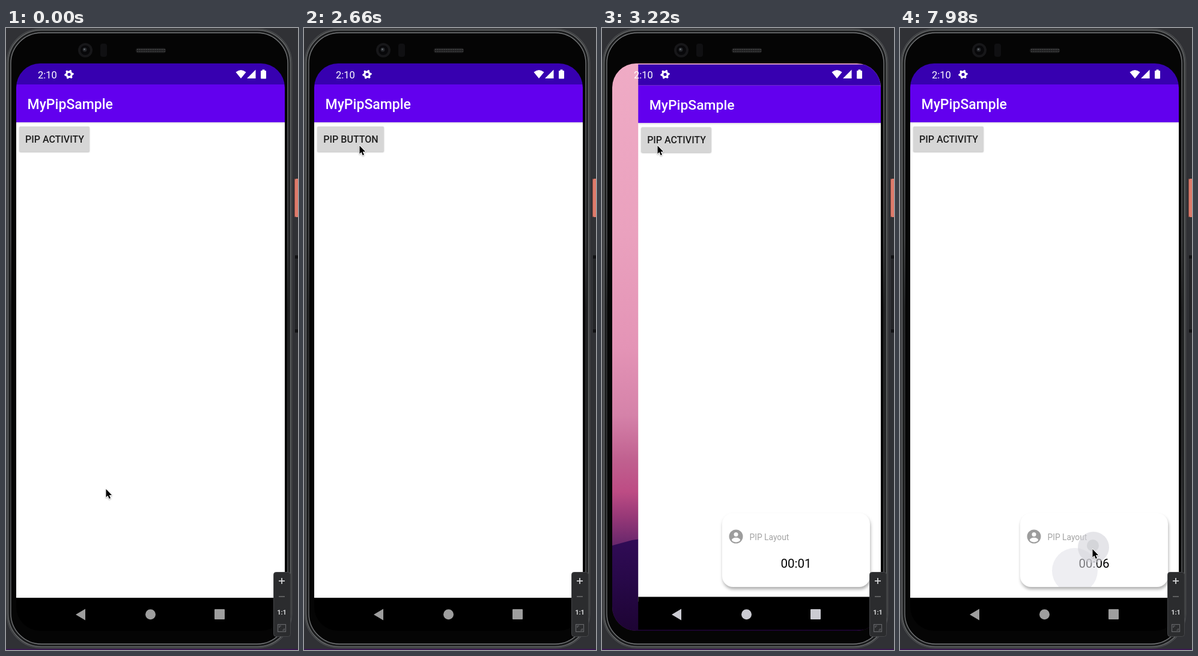
These frames come from a looping animation (486 by 1036 pixels, 8 s). An HTML page with a canvas:

```html
<!DOCTYPE html>
<html lang="en">
<head>
<meta charset="utf-8">
<title>Picture in picture</title>
<style>
html, body { margin: 0; width: 486px; height: 1036px; overflow: hidden; background: #2d2e32; }
canvas { display: block; }
</style>
</head>
<body>
<canvas id="stage" width="486" height="1036"></canvas>
<script>
const c = document.getElementById('stage').getContext('2d');
const LOOP = 8000, STEP = 70;
const SCREEN = { x: 17, y: 59, w: 447, h: 945 };
const PIP = { x: 200, y: 808, w: 246, h: 123 };

const clamp = v => Math.max(0, Math.min(1, v));
const mix = (a, b, k) => a + (b - a) * k;
const span = (t, start, end) => clamp((t - start) / (end - start));
const smooth = k => k * k * (3 - 2 * k);

// cubic-bezier(.4, 0, .2, 1)
function ease(x) {
  if (x <= 0 || x >= 1) return clamp(x);
  let lo = 0, hi = 1, s = .5;
  for (let i = 0; i < 24; i++) {
    s = (lo + hi) / 2;
    const u = 1 - s;
    if (1.2 * u * u * s + .6 * u * s * s + s * s * s < x) lo = s; else hi = s;
  }
  return s * s * (3 - 2 * s);
}

function rect(x, y, w, h, fill) {
  c.fillStyle = fill;
  c.fillRect(x, y, w, h);
}
function round(x, y, w, h, r, fill, stroke, line = 1) {
  c.beginPath();
  c.roundRect(x, y, w, h, r);
  if (fill) { c.fillStyle = fill; c.fill(); }
  if (stroke) { c.strokeStyle = stroke; c.lineWidth = line; c.stroke(); }
}
function disc(x, y, r, fill) {
  c.beginPath();
  c.arc(x, y, r, 0, Math.PI * 2);
  c.fillStyle = fill;
  c.fill();
}
function poly(points, fill, stroke, line = 1) {
  c.beginPath();
  points.forEach(([x, y]) => c.lineTo(x, y));
  c.closePath();
  if (stroke) { c.strokeStyle = stroke; c.lineWidth = line; c.stroke(); }
  if (fill) { c.fillStyle = fill; c.fill(); }
}
function lines(color, width, ...paths) {
  c.strokeStyle = color;
  c.lineWidth = width;
  for (const path of paths) {
    c.beginPath();
    path.forEach(([x, y]) => c.lineTo(x, y));
    c.stroke();
  }
}
function text(str, x, y, size, color, weight = 400, align = 'left') {
  c.font = `${weight} ${size}px Roboto, sans-serif`;
  c.textAlign = align;
  c.textBaseline = 'alphabetic';
  c.fillStyle = color;
  c.fillText(str, x, y);
}
function layer(draw) {
  c.save();
  draw();
  c.restore();
}
function vertical(y0, y1, ...stops) {
  const g = c.createLinearGradient(0, y0, 0, y1);
  stops.forEach(([at, color]) => g.addColorStop(at, color));
  return g;
}

function gear(x, y, r, hole, color) {
  c.beginPath();
  for (let i = 0; i < 24; i++) {
    const a = (i - 1) * Math.PI / 12;
    const d = i % 4 < 2 ? r : r * .74;
    c.lineTo(x + Math.cos(a) * d, y + Math.sin(a) * d);
  }
  c.closePath();
  c.moveTo(x + hole, y);
  c.arc(x, y, hole, 0, Math.PI * 2);
  c.fillStyle = color;
  c.fill('evenodd');
}

function phone() {
  rect(0, 0, 486, 1036, '#303135');
  rect(0, 1034, 486, 2, '#3a1a50');
  rect(481, 378, 5, 130, '#242528');
  rect(481, 379, 5, 5, '#101012');
  rect(481, 502, 5, 5, '#101012');
  round(481, 251, 8, 64, 2, '#de7b6b');
  rect(480, 251, 1, 64, '#8b4a41');
  round(1.5, 1.5, 474, 1031, 57, '#1b1c1d', '#4c4e50', 1.5);
  round(3.5, 3.5, 470, 1027, 55, null, '#6a6c6e', 1.5);
  round(8, 8, 461, 1018, 51, '#030303',
    vertical(8, 1026, [0, '#77797b'], [.34, '#58595b'], [.45, '#2b2c2d'], [.68, '#3a3b3c'], [1, '#77797b']), 1.4);
  round(10, 10, 457, 1014, 50, '#050505');

  disc(132, 37, 12, '#171719');
  disc(132, 37, 8, '#08080a');
  disc(131, 36, 3.5, '#25272b');
  disc(130.5, 35.5, 1.3, '#70757a');
  round(157, 26, 11, 22, 4, '#101012');
  round(216, 33.5, 50, 8, 4, '#1b1b1c');
  for (let i = 0; i < 16; i++) {
    disc(219 + i * 3, 35.8, .9, '#58595a');
    disc(219 + i * 3, 39.2, .9, '#48494a');
  }
}

function clipScreen() {
  c.beginPath();
  c.roundRect(SCREEN.x, SCREEN.y, SCREEN.w, SCREEN.h, 40);
  c.clip();
}

function wallpaper() {
  rect(17, 59, 447, 945, vertical(59, 1004,
    [0, '#efabc5'], [.3, '#eaa1be'], [.5, '#e494b6'], [.62, '#d582a9'],
    [.7, '#c0608f'], [.755, '#bd4c84'], [.8, '#963877'], [.86, '#5d2369']));
  poly([[17, 862], [50, 853], [85, 848], [110, 842], [200, 826], [464, 800], [464, 1004], [17, 1004]],
    vertical(840, 1004, [0, '#320c58'], [.5, '#270848'], [1, '#1d0433']));
}

function appBody(label, pressed) {
  rect(17, 59, 447, 35, '#3700b0');
  rect(17, 94, 447, 63, '#6200ee');
  rect(17, 157, 447, 800, '#fff');
  rect(17, 157, 447, 3, vertical(157, 160, [0, '#dcd8e2'], [1, '#fff']));
  text('MyPipSample', 35.5, 135, 23, '#fff', 500);
  const width = label === 'PIP ACTIVITY' ? 117 : 111;
  layer(() => {
    c.shadowColor = `rgba(0,0,0,${pressed ? .38 : .25})`;
    c.shadowBlur = pressed ? 4 : 2;
    c.shadowOffsetY = 1;
    round(22, 164, width, 42, 2, pressed > .5 ? '#c1bec2' : '#d6d6d6');
  });
  text(label, 22.5 + width / 2, 191, 16, '#1d1d1d', 500, 'center');
}
function app(label, pressed = 0) {
  appBody(label, pressed);
  rect(17, 949, 447, 55, '#000');
}

function statusBar() {
  text('2:10', 53, 83.5, 16.5, '#fff');
  gear(105, 77.3, 7.8, 2.6, '#fff');
  c.fillStyle = '#fff';
  c.beginPath();
  c.moveTo(391, 84);
  c.lineTo(382.5, 73.5);
  c.quadraticCurveTo(391, 66.5, 399.5, 73.5);
  c.fill();
  poly([[401, 84], [415.5, 84], [415.5, 69.5]], '#fff');
  round(424, 71, 9, 13.5, 1, '#fff');
  rect(426.5, 69.3, 4, 2, '#fff');
}

function navBar(light) {
  const g = Math.round(mix(158, 203, light));
  const color = `rgb(${g},${g},${g + Math.round(7 * light)})`;
  poly([[116, 977], [132, 967.5], [132, 986.5]], color);
  disc(240.5, 976.8, 8.5, color);
  round(347, 968, 17, 17, 1, color);
}

function panel() {
  round(445.5, 906.5, 28, 107, 4, '#2b2c2e', '#454649');
  lines('#d4d5d6', 1.8, [[454, 921], [464, 921]], [[459, 916], [459, 926]]);
  lines('#6a6b6d', 1.6, [[454, 947], [464, 947]]);
  text('1:1', 459, 977, 11, '#d4d5d6', 700, 'center');
  c.strokeStyle = '#66676a';
  c.lineWidth = 1.2;
  c.strokeRect(452.5, 993.5, 13, 12);
  lines('#66676a', 1.2, [[455, 999], [455, 996], [458, 996]], [[463, 1000], [463, 1003], [460, 1003]]);
}

function cardShape(box, r) {
  layer(() => {
    c.shadowColor = 'rgba(0,0,0,.3)';
    c.shadowBlur = 5;
    c.shadowOffsetX = 1;
    c.shadowOffsetY = 4;
    round(box.x, box.y, box.w, box.h, r, '#fff');
  });
}

// The full window squeezed on its way into the corner.
function shrinkingWindow(k) {
  const box = {};
  for (const key in SCREEN) box[key] = mix(SCREEN[key], PIP[key], k);
  const r = mix(34, 14, k);
  cardShape(box, r);
  layer(() => {
    c.beginPath();
    c.roundRect(box.x, box.y, box.w, box.h, r);
    c.clip();
    c.translate(box.x, box.y);
    c.scale(box.w / SCREEN.w, box.h / SCREEN.h);
    c.translate(-17, -59);
    layer(() => {
      c.translate(0, -14 * clamp(k * 2));
      appBody('PIP BUTTON', 1);
    });
    rect(17, 949, 447, 55, '#000');
  });
}

function pipCard(t) {
  cardShape(PIP, 18);
  disc(223, 847, 11.5, '#9d9d9d');
  disc(223, 843.6, 3.5, '#fff');
  c.beginPath();
  c.ellipse(223, 852.6, 7, 3.8, 0, 0, Math.PI * 2);
  c.fill();
  text('PIP Layout', 245.5, 853, 13.8, '#a3a3a3');
  const seconds = Math.floor((t - 1400) / 1000);
  text('00:0' + seconds, 323, 899, 20.5, '#000', 400, 'center');
}

function closeIcon(color) {
  lines(color, 1.6, [[413, 829], [425, 841]], [[425, 829], [413, 841]]);
}

function menu(t) {
  const shown = span(t, 4270, 4410) * (1 - span(t, 7840, 7980));
  layer(() => {
    c.beginPath();
    c.roundRect(PIP.x, PIP.y, PIP.w, PIP.h, 18);
    c.clip();
    if (t >= 4270 && t < 4340) closeIcon('#e2e2e2');
    c.globalAlpha = shown;
    rect(PIP.x, PIP.y, PIP.w, PIP.h, 'rgba(0,0,0,.295)');
    if (t >= 6090 && t < 6580) {
      c.globalAlpha = shown * (1 - span(t, 6300, 6510));
      disc(291, 902, mix(8, 30, smooth(span(t, 6090, 6300))), 'rgba(255,255,255,.22)');
    }
    if (t >= 7770) {
      const fade = span(t, 7840, 7980);
      c.globalAlpha = 1;
      disc(291, 904, 38, `rgba(225,225,231,${.55 * fade})`);
      disc(322, 865, mix(12, 26, span(t, 7700, 7980)), `rgba(212,212,218,${mix(.3, .6, fade)})`);
      disc(321, 862, 10, `rgba(190,194,198,${.45 * fade})`);
    }
    c.globalAlpha = shown;
    gear(228, 835, 10.5, 6.2, '#fff');
    disc(228, 835, 3, '#fff');
    closeIcon('#fff');
    for (const sx of [-1, 1]) for (const sy of [-1, 1])
      lines('#fff', 2.4, [[323 + sx * 3.5, 861 + sy * 8.7], [323 + sx * 8.7, 861 + sy * 8.7], [323 + sx * 8.7, 861 + sy * 3.5]]);
    round(287.8, 902, 6.5, 10, 1, null, '#fff', 1.6);
    for (const r of [4.5, 7.5]) {
      c.beginPath();
      c.arc(291, 901, r, Math.PI * 1.22, Math.PI * 1.78);
      c.stroke();
    }
    c.beginPath();
    c.moveTo(343.5, 903.5);
    c.quadraticCurveTo(354.5, 894.5, 365.5, 903.5);
    c.lineTo(362, 907);
    c.lineTo(358.3, 904.5);
    c.lineTo(358, 901.3);
    c.quadraticCurveTo(354.5, 900.3, 351, 901.3);
    c.lineTo(350.7, 904.5);
    c.lineTo(347, 907);
    c.fillStyle = '#fff';
    c.fill();
  });
}

// start, end, x, y of each pointer move
const MOVES = [
  [0, 770, 74, 203], [1750, 2380, 92, 195], [2450, 2520, 92, 196],
  [3430, 4200, 331, 859], [4690, 5390, 288, 906], [6650, 7560, 320, 868]
];
function pointer(t) {
  let x = 166, y = 768;
  for (const [start, end, toX, toY] of MOVES) {
    const k = smooth(span(t, start, end));
    x = mix(x, toX, k);
    y = mix(y, toY, k);
  }
  layer(() => {
    c.translate(x + .5, y);
    c.lineJoin = 'round';
    c.shadowColor = 'rgba(0,0,0,.3)';
    c.shadowBlur = 2;
    c.shadowOffsetY = 1;
    const arrow = [[0, 0], [0, 13.5], [3, 10.8], [5.2, 16], [7.5, 15], [5.3, 10], [9.6, 10]];
    poly(arrow, null, '#fff', 2);
    c.shadowColor = 'transparent';
    poly(arrow, '#000');
  });
}

function launch(t) {
  const k = ease(span(t, 1260, 1690));
  layer(() => {
    c.translate(0, -18 * k);
    app('PIP ACTIVITY', .4);
  });
  layer(() => {
    c.beginPath();
    c.rect(17, 59 + 906 * (1 - k), 447, 945);
    c.clip();
    c.translate(0, 39 * (1 - k));
    app('PIP BUTTON');
  });
}

function returnToMain(t) {
  const k = ease(span(t, 2850, 3430));
  if (k < 1) wallpaper();
  const s = .98 + .02 * k * k;
  layer(() => {
    c.translate(17 + 447 * (1 - k), 531.5);
    c.scale(s, s);
    c.translate(-17, -531.5);
    app('PIP ACTIVITY');
  });
}

function draw(t) {
  phone();
  layer(() => {
    clipScreen();
    if (t < 1260) app('PIP ACTIVITY', t >= 980 ? .4 : 0);
    else if (t < 1690) launch(t);
    else if (t < 2800) app('PIP BUTTON', t >= 2730 ? 1 : 0);
    else {
      returnToMain(t);
      const k = ease(span(t, 2790, 3215));
      if (k < 1) shrinkingWindow(k);
      else {
        pipCard(t);
        menu(t);
      }
    }
    statusBar();
    navBar(span(t, 2800, 3220) * (1 - span(t, 4270, 4410)));
  });
  panel();
  pointer(t);
}

function tick() {
  const t = performance.now() % LOOP;
  draw(Math.floor(t / STEP) * STEP);
  requestAnimationFrame(tick);
}
tick();
</script>
</body>
</html>
```
